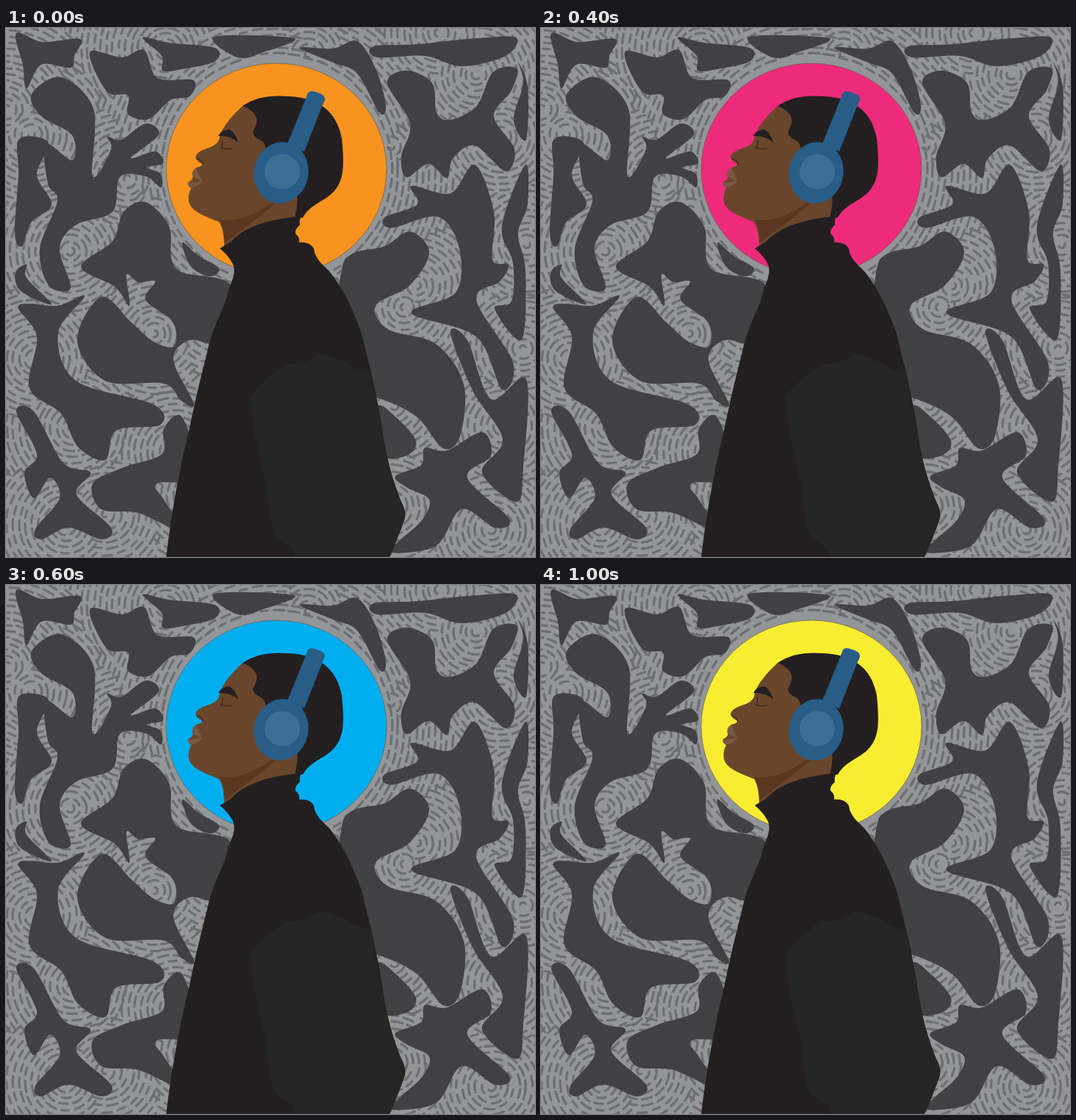
These frames come from a looping animation (720 by 720 pixels, 1.2 s). An HTML page with a canvas:

```html
<!DOCTYPE html>
<html lang="en">
<head>
<meta charset="utf-8">
<title>Headphones</title>
<style>
html, body { margin: 0; width: 100%; height: 100%; overflow: hidden; background: #939598; }
canvas, svg { position: absolute; left: 0; top: 0; width: 720px; height: 720px; }
</style>
</head>
<body>
<canvas id="pattern" width="720" height="720"></canvas>
<svg viewBox="0 0 720 720">
  <ellipse id="halo" cx="368" cy="192.5" rx="150" ry="144.5" stroke="#6b5a4a" stroke-width=".7"/>
  <!-- face and neck -->
  <path fill="#69462b" d="M322 106C307 120 292 137 290 152Q287 160 273 164Q258 169 258 177Q260 181 267 185Q268 188 259 190Q252 195 254 201Q256 205 248 210Q247 214 252 218Q247 228 249 237C252 250 273 257 290 264Q297 275 297 300L330 285L398 262V215L350 110Z"/>
  <path fill="#5a3720" d="M290 261C320 264 342 252 361 238H368Q335 265 297 293Q299 274 290 261Z"/>
  <path fill="#7a5944" d="M259 190Q252 196 254 202L265 208Q259 211 248 210Q246 214 251 217Q260 217 267 209Q263 200 259 190Z"/>
  <path fill="#231f20" d="M289 147Q292 139 304 138Q313 143 316 156Q306 146 289 147Z"/>
  <path fill="none" stroke="#231f20" d="M291 163Q300 166 308 164M295 153L294 163M260 178Q268 180 268 186"/>
  <!-- hair -->
  <path fill="#231f20" d="M322 106C340 94 360 91 385 93C425 95 450 113 457 150C461 190 459 205 449 219C438 235 414 239 404 258H393Q398 240 396 225L354 166Q352 154 345 152Q336 148 336 141C341 132 344 125 338 117Q334 111 322 106Z"/>
  <!-- coat -->
  <path fill="#231f20" d="M218 720C226 655 236 600 249 548C261 490 267 470 275 436C283 402 297 383 302 360C306 345 314 336 309 322C304 312 299 307 291 300L306 291Q330 264 392 257L401 258Q399 264 400 268Q391 276 395 281Q400 285 399 292C411 291 420 296 420 306C425 318 430 321 440 331C460 355 475 390 484 416C495 460 505 500 512 545C518 590 528 620 538 645Q546 660 542 670Q535 690 522 720Z"/>
  <path fill="#252525" d="M333 502C339 492 350 482 360 474Q374 462 384 457Q400 459 412 452Q425 444 433 444Q447 449 460 454Q475 465 496 470C503 505 508 530 512 545C518 590 528 620 538 645Q546 660 542 670Q535 690 522 720H393Q393 708 388 706L368 694C359 677 357 650 355 627C349 590 334 550 335 520Z"/>
  <!-- headphones -->
  <path fill="#275d87" d="M382 160L408 96L411 88Q415 84 424 88Q435 91 434 98L428 112L406 168Z"/>
  <ellipse cx="374.500" cy="197" rx="37" ry="42" fill="#275d87" transform="rotate(12 374.500 197)"/>
  <circle cx="376" cy="195.500" r="24" fill="#396f93"/>
</svg>
<script>
const ctx = document.getElementById("pattern").getContext("2d");
const halo = document.getElementById("halo");
const colors = ["#f8931f", "#be1e2d", "#ee2a7b", "#00aeef", "#f15a29", "#f9ed32"];

let seed = 7;
const random = () => (seed = seed * 16807 % 2147483647) / 2147483647;

// One swirl of dashes around the halo, the others scattered over a loose grid
const swirls = [{ x: 368, y: 192, start: 156 }];
for (let gx = 0; gx < 720; gx += 120) {
  for (let gy = 0; gy < 720; gy += 120) {
    swirls.push({ x: gx + 120 * random(), y: gy + 120 * random(), start: 4 });
  }
}

function drawDashes() {
  ctx.strokeStyle = "#6d6e71";
  ctx.lineWidth = 3.3;
  ctx.lineCap = "round";
  const reach = (s, x, y) => Math.hypot(x - s.x, y - s.y) - s.start;
  for (const swirl of swirls) {
    for (let r = swirl.start; r < swirl.start + 200; r += 8.5) {
      const step = 20 / r, first = random() * step;
      for (let a = first; a < first + 2 * Math.PI - step / 2; a += step) {
        const x = swirl.x + r * Math.cos(a), y = swirl.y + r * Math.sin(a);
        const own = reach(swirl, x, y);
        if (swirls.some(s => reach(s, x, y) < own - 2)) continue;
        const half = (4.5 + random() * 3) / r;
        ctx.beginPath();
        ctx.arc(swirl.x, swirl.y, r + random() * 2, a - half, a + half);
        ctx.stroke();
      }
    }
  }
}

// Closed smooth shape through a few key points
function blob(text) {
  const pts = text.split(" ").map(p => p.split(",").map(Number));
  const at = i => pts[(i + pts.length) % pts.length];
  ctx.beginPath();
  ctx.moveTo(...pts[0]);
  pts.forEach(([x, y], i) => {
    const [ax, ay] = at(i - 1), [bx, by] = at(i + 1), [cx, cy] = at(i + 2);
    ctx.bezierCurveTo(x + (bx - ax) / 6, y + (by - ay) / 6, bx - (cx - x) / 6, by - (cy - y) / 6, bx, by);
  });
  ctx.fill();
}

ctx.fillStyle = "#939598";
ctx.fillRect(0, 0, 720, 720);
drawDashes();
ctx.fillStyle = "#414042";

// Top
blob("14,7 50,19 101,15 93,38 88,54 48,50 28,82 23,50");
blob("114,33 158,40 188,30 206,68 255,71 250,93 224,98 194,124 166,117 166,92 137,86");
blob("186,13 222,20 284,27 285,45 245,55 214,58 212,38");
blob("284,12 392,14 350,33 315,40");
blob("400,27 445,28 478,18 503,55 517,105 508,115 478,62 445,47");
blob("500,25 560,22 640,14 694,13 680,38 620,52 570,38 505,40");

// Left
blob("75,67 35,90 48,120 90,146 90,180 54,158 57,212 70,235 46,300 58,350 88,354 73,300 95,268 145,250 155,203 190,202 211,217 210,198 192,190 214,184 203,168 170,177 208,145 190,130 157,152 138,148 143,165 118,202 119,110");
blob("18,151 58,156 42,200 62,240 34,265 22,297 12,280 17,200");
blob("13,333 28,322 28,340 62,376 20,358");
blob("17,378 70,378 107,365 71,415 95,480 200,512 210,540 150,548 135,588 98,570 75,525 32,490 42,420");
blob("14,522 38,522 78,592 115,605 96,635 143,680 130,696 85,680 48,696 40,682 73,640 60,612 38,640 25,605 42,580");
blob("118,620 160,598 212,580 215,545 240,530 260,610 205,620 215,642 240,685 180,660 130,655");
blob("240,292 262,310 290,327 278,338 252,325");
blob("190,237 222,270 232,328 306,350 300,428 250,425 228,452 256,512 238,507 215,484 135,480 97,425 130,366 172,402 201,427 229,433 227,400 190,370 203,345 180,346 164,336 168,378 148,352 102,325 145,290 160,250");

// Right
blob("545,58 580,75 586,115 604,125 640,107 663,60 695,55 688,85 664,120 692,165 680,195 638,160 608,178 600,204 575,185 545,203 538,175 550,130 519,75");
blob("697,47 710,80 708,152 691,125 704,75");
blob("515,258 560,240 552,215 605,225 638,186 664,250 662,315 684,322 672,345 640,370 690,455 675,492 640,420 552,388 612,360 617,300 588,257 525,272");
blob("707,186 710,240 697,280 707,330 702,424 665,382 688,372 690,320 675,270");
blob("455,340 470,308 515,297 550,277 576,305 550,350 503,378 520,410 585,430 623,485 618,555 595,572 560,530 514,506 440,480");
blob("505,516 530,529 558,562 545,582 510,580");
blob("605,415 628,425 660,505 708,478 704,600 695,645 648,605 676,560 636,495");
blob("570,572 600,575 648,550 660,582 628,612 685,668 665,680 620,655 585,705 522,714 535,698 566,670 576,642 545,625 530,610 565,595");

function frame() {
  halo.setAttribute("fill", colors[Math.floor(performance.now() / 200) % colors.length]);
  requestAnimationFrame(frame);
}
frame();
</script>
</body>
</html>
```
